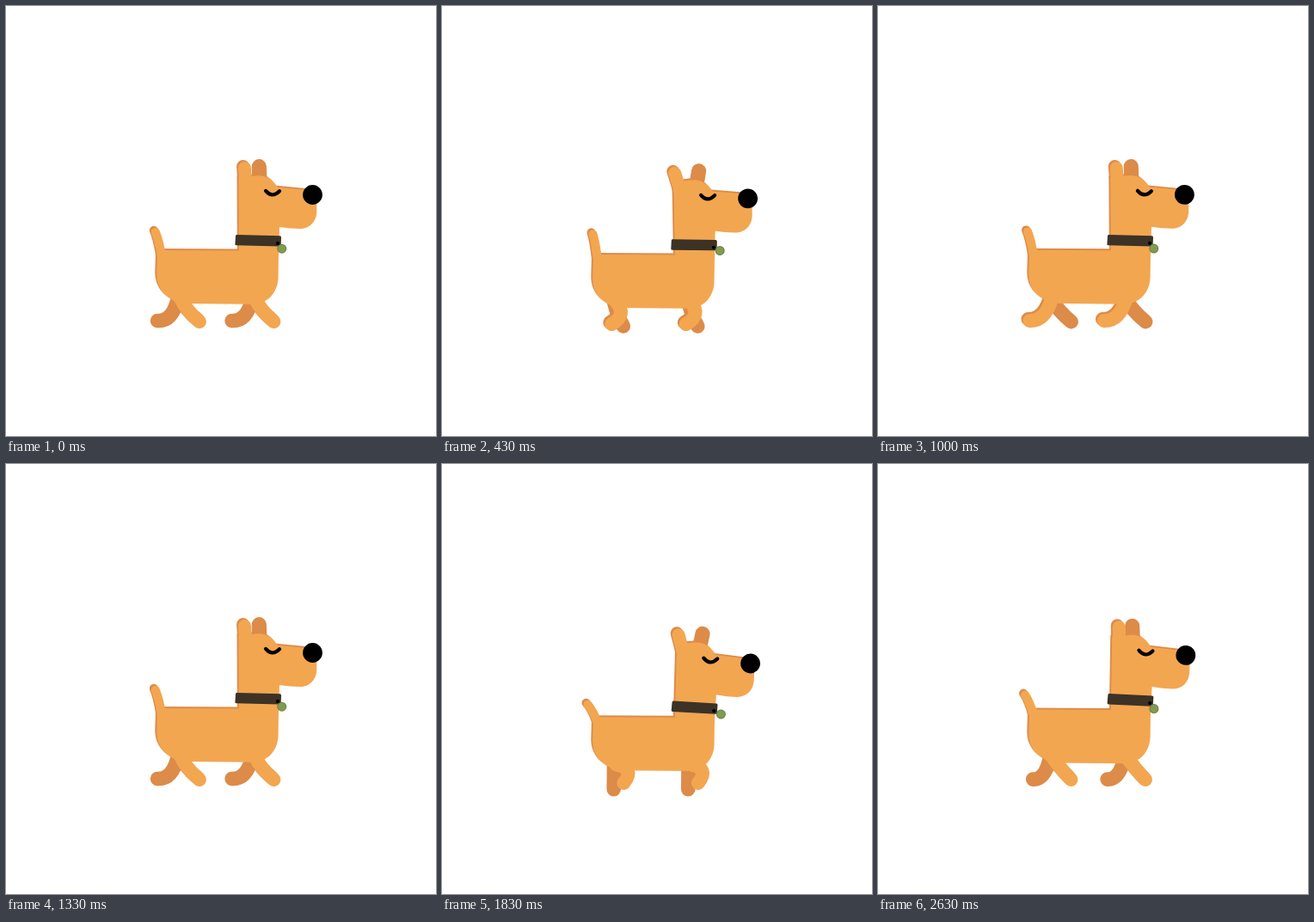
Recreate the animation shown at these times as an HTML page with a canvas. Size 500 px wide and 500 px high, loop 2.66 s.

```html
<!DOCTYPE html>
<html lang="en">
<head>
<meta charset="utf-8">
<title>Walking dog</title>
<style>
  html, body { margin: 0; width: 100%; height: 100%; overflow: hidden; background: #fff; }
  canvas { display: block; width: 500px; height: 500px; }
</style>
</head>
<body>
<canvas id="stage" width="500" height="500"></canvas>
<script>
const ctx = document.getElementById('stage').getContext('2d');
const STEP = 665; // one full stride in ms
const COAT = '#f3a650', SHADE = '#dc8b49', BLACK = '#000';
const RIM = [-1.9, -2];
const FRONT = 86.5; // distance from hind to front legs

const BODY = new Path2D('M176 284 L270 284.5 L317 284 L316.6 316 C316 332 306 345 289 346.8 L205 346 C186 341 175.5 330 175.2 312 Z');
const HEAD = new Path2D('M270.8 288 L270.4 200 Q272 197 285 198 L290 197.5 C302 196 309 201 316 210.8 L352 214.3 Q361.3 216 361.3 228 L361.3 238 C361.3 252 352 259 342 259 Q330 259 318 257 L317 290 Z');
const EYE = new Path2D('M302 215 Q309.5 224 318 215.4');
const COLLAR = new Path2D('M268.5 266 L318.5 267.4 Q320 267.5 320 269 L319.7 278 Q319.7 279.6 318 279.6 L268 278.4 Q266.4 278.3 266.4 277 L267 267.4 Q267.1 266 268.5 266 Z');

// stride phase, foot x, foot y, knee x, knee y
const GAIT = [
  [0, 225, 367, 210, 355],
  [.1, 216, 370, 206, 358],
  [.25, 200, 378, 200, 366],
  [.3, 198, 381, 202, 367],
  [.35, 195, 376.5, 203, 366],
  [.45, 181, 367, 195, 367],
  [.5, 176, 366, 194, 367],
  [.6, 190, 369, 210, 362],
  [.75, 211, 371, 225, 354],
  [.85, 213.5, 368, 225, 352],
  [.95, 224, 367, 212, 353]
];

const wave = (p, mid, amp, peak) => mid + amp * Math.cos(4 * Math.PI * (p - peak));

function key(i) {
  const n = GAIT.length, k = GAIT[(i + n) % n];
  return [k[0] + Math.floor(i / n), ...k.slice(1)];
}

// periodic cubic through the gait keys
function gait(p) {
  p -= Math.floor(p);
  let i = GAIT.length - 1;
  while (GAIT[i][0] > p) i--;
  const [a, b, c, d] = [i - 1, i, i + 1, i + 2].map(key);
  const h = c[0] - b[0], s = (p - b[0]) / h, s2 = s * s, s3 = s2 * s;
  return [1, 2, 3, 4].map(j => {
    const m = h * (c[j] - a[j]) / (c[0] - a[0]);
    const n = h * (d[j] - b[j]) / (d[0] - b[0]);
    return (2 * s3 - 3 * s2 + 1) * b[j] + (s3 - 2 * s2 + s) * m
      + (3 * s2 - 2 * s3) * c[j] + (s3 - s2) * n;
  });
}

function curve(width, x0, y0, cx, cy, x1, y1) {
  ctx.lineWidth = width;
  ctx.beginPath();
  ctx.moveTo(x0, y0);
  ctx.quadraticCurveTo(cx, cy, x1, y1);
  ctx.stroke();
}

function dot(x, y, r, color) {
  ctx.fillStyle = color;
  ctx.beginPath();
  ctx.arc(x, y, r, 0, 2 * Math.PI);
  ctx.fill();
}

function legs(p, hipX, bob, width) {
  const [fx, fy, kx, ky] = gait(p);
  for (const dx of [0, FRONT]) {
    curve(width, hipX + dx, 339 + bob, kx + dx, ky, fx + dx, fy);
  }
}

function paint(color) {
  ctx.fillStyle = ctx.strokeStyle = color;
}

function shift(dx, dy, draw) {
  ctx.save();
  ctx.translate(dx, dy);
  draw();
  ctx.restore();
}

function turnHead(pose, draw) {
  ctx.save();
  ctx.translate(293, 285 + pose.bob);
  ctx.rotate(pose.tilt * Math.PI / 180);
  ctx.translate(-293, -285);
  draw();
  ctx.restore();
}

function nearSide(pose, color) {
  const { p, bob, tilt, ear } = pose, u = tilt / 3;
  paint(color);
  legs(p, 202.5, bob, 16);
  curve(10.2, 173.8 - 7 * u, 263 + 10.5 * u + bob, 178 - 3 * u, 273 + 7 * u + bob, 181, 291 + bob);
  shift(0, bob, () => ctx.fill(BODY));
  turnHead(pose, () => {
    ctx.fill(HEAD);
    curve(15, 278.2 - ear, 188.5 + ear * .1, 278.6 - ear * .4, 202, 279.6, 216);
  });
}

function face({ ear, tilt }) {
  dot(356.5, 219.6, 11.4, BLACK);
  paint(BLACK);
  ctx.lineWidth = 4.2;
  ctx.stroke(EYE);
  ctx.fillStyle = '#3c3226';
  ctx.fill(COLLAR);
  const x = 320.4 + ear * .5 + tilt * .4, y = 282.6 - ear * .45 - tilt * .1;
  dot(x, y, 5.5, '#6f7d45');
  dot(x, y, 4.5, '#7f9c50');
  dot(316, 276, 2.1, BLACK);
}

function draw(ms) {
  const p = ms / STEP % 1;
  const pose = {
    p,
    bob: wave(p, 5.1, 5.4, .274),
    tilt: wave(p, .9, 2.15, .342),
    ear: wave(p, 3.5, 3.5, .2)
  };
  ctx.fillStyle = '#fff';
  ctx.fillRect(0, 0, 500, 500);
  ctx.lineCap = ctx.lineJoin = 'round';

  paint(SHADE);
  legs(p + .5, 200, pose.bob, 16.6);
  turnHead(pose, () => curve(17.2, 293.6 + pose.ear, 186.8, 294.5 + pose.ear * .5, 200, 295, 212));

  shift(...RIM, () => nearSide(pose, SHADE));
  nearSide(pose, COAT);
  turnHead(pose, () => face(pose));
}

const start = performance.now();
function tick() {
  draw(performance.now() - start);
  requestAnimationFrame(tick);
}
tick();
</script>
</body>
</html>
```
